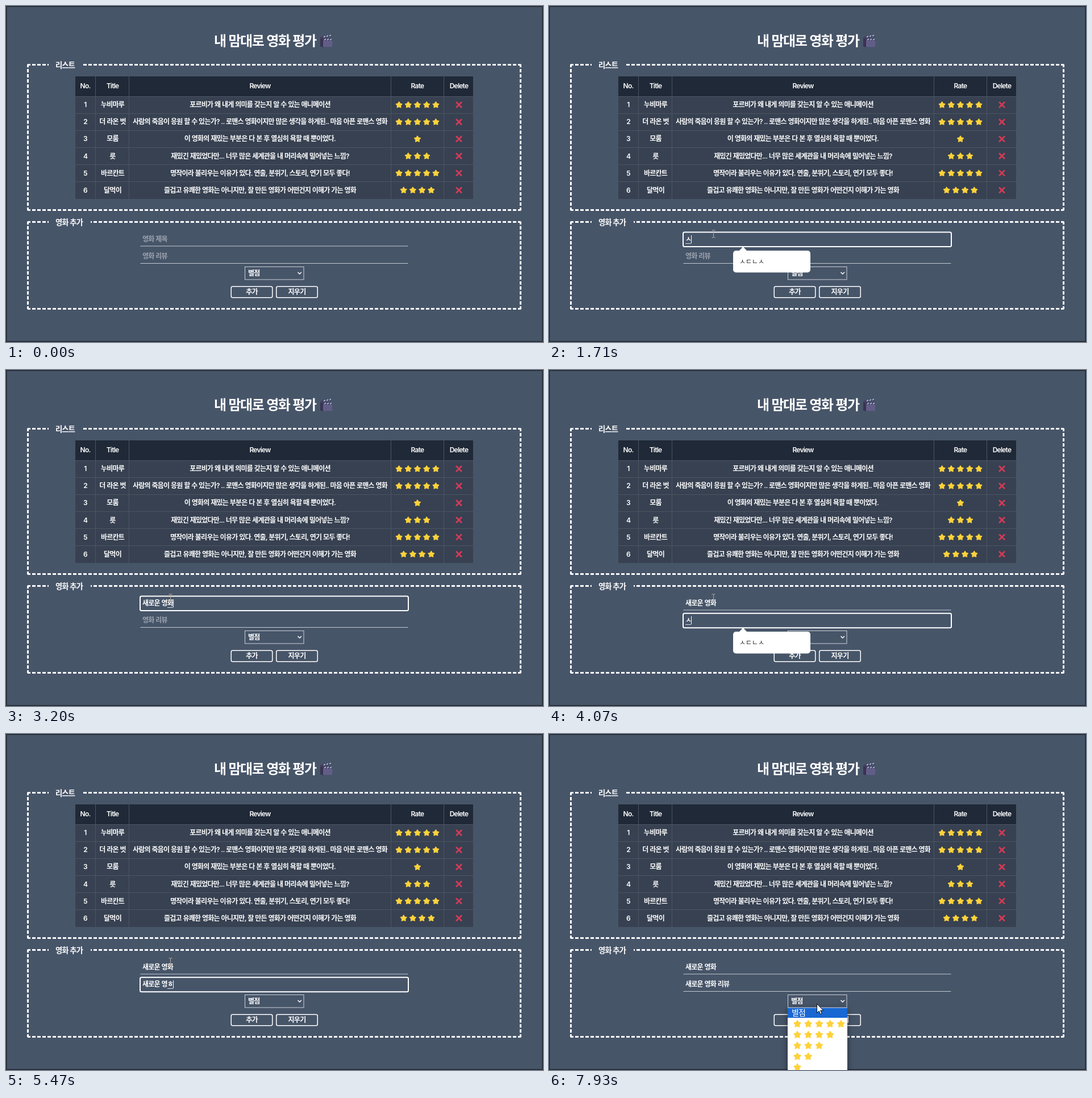
These frames come from a looping animation (945 px wide and 592 px high, 8 s). An HTML page:

```html
<!DOCTYPE html>
<html lang="ko">
<head>
<meta charset="utf-8">
<style>
  html, body { margin: 0; width: 100%; height: 100%; overflow: hidden; background: #475569; }
  body, svg text { font: 600 12px Inter, "Noto Sans CJK KR", "Noto Sans CJK", sans-serif; letter-spacing: -.065em; word-spacing: .04em; }
  body { position: relative; color: #fff; }
  svg { position: absolute; left: 0; top: 0; }
  text { fill: #fff; white-space: pre; }
  svg .title { font-size: 24px; font-weight: 700; }
  svg .legend { font-size: 13.3px; font-weight: 800; }
  svg .option { font-size: 14px; font-weight: 500; }
  svg .hint { font-weight: 400; letter-spacing: 0; fill: #222; }
  .mid { text-anchor: middle; }
  .box { position: absolute; left: 37px; width: 870px; box-sizing: border-box; border: 3px dashed #fff; border-radius: 3px; }
  .field { position: absolute; left: 240px; height: 25px; line-height: 25px; white-space: pre; }
  .field u { text-decoration: none; box-shadow: 0 1px #d5dae1; }
  .field i { display: inline-block; width: 1px; height: 14px; margin-right: -1px; vertical-align: -3px; background: #fff; }
  .field span { color: #9ca3af; }
</style>
</head>
<body>
<div class="box" style="top:102px;height:259px"></div>
<div class="box" style="top:379px;height:156px"></div>
<svg id="page" width="945" height="592"></svg>
<div class="field" style="top:398px"></div>
<div class="field" style="top:428px"></div>
<svg id="overlay" width="945" height="592">
  <g id="popup">
    <path d="M334 432l7.5-8 7.5 8z" fill="#fff"/>
    <rect x="324" y="431" width="136" height="38.5" rx="5" fill="#fff"/>
    <text class="hint" x="335" y="455">ㅅㄷㄴㅅ</text>
  </g>
  <g id="menu"></g>
  <path id="arrow" d="M0 0v16l3.7-3.5 2.4 5.6 2.5-1-2.4-5.5h5z" fill="#fff" stroke="#111" stroke-width="1"/>
  <path id="ibeam" d="M-3 -6.5h2.5l.5 .5l.5-.5h2.5M0 -6v12M-3 6.5h2.5l.5-.5l.5 .5h2.5" fill="none" stroke="#b8aa96"/>
</svg>
<script>
const LOOP = 8000;
const $ = id => document.getElementById(id);
const rect = (x, y, w, h, attrs) => `<rect x="${x}" y="${y}" width="${w}" height="${h}" ${attrs}/>`;
const line = (x1, y1, x2, y2, color) => `<path d="M${x1} ${y1}L${x2} ${y2}" stroke="${color}"/>`;
const label = (x, y, text, cls = 'mid') => `<text x="${x}" y="${y}" class="${cls}">${text}</text>`;

function star(x, y, r) {
  const points = Array.from({ length: 10 }, (_, i) => {
    const a = i * Math.PI / 5 - Math.PI / 2, d = i % 2 ? r * .55 : r;
    return `${(x + d * Math.cos(a)).toFixed(2)},${(y + d * Math.sin(a)).toFixed(2)}`;
  });
  return `<polygon points="${points.join(' ')}" fill="#ffd23b" stroke="#ffd23b" stroke-width="1.6" stroke-linejoin="round"/>`;
}
const stars = (count, x, y, gap, r) =>
  Array.from({ length: count }, (_, i) => star(x + i * gap, y, r)).join('');

const movies = [
  ['누비마루', '포르비가 왜 내게 의미를 갖는지 알 수 있는 애니메이션', 5],
  ['더 라온 벗', '사람의 죽음이 응원 할 수 있는가? .. 로맨스 영화이지만 많은 생각을 하게된.. 마음 아픈 로맨스 영화', 5],
  ['모룸', '이 영화의 재밌는 부분은 다 본 후 열심히 욕할 때 뿐이었다.', 1],
  ['릇', '재밌긴 재밌었다만... 너무 많은 세계관을 내 머리속에 밀어넣는 느낌?', 3],
  ['바르칸트', '명작이라 불리우는 이유가 있다. 연출, 분위기, 스토리, 연기 모두 좋다!', 5],
  ['달먹이', '즐겁고 유쾌한 영화는 아니지만, 잘 만든 영화가 어떤건지 이해가 가는 영화', 4],
];
const columns = [121.5, 157.5, 216.5, 677.5, 770.5, 822.5];
const centers = [139.5, 187.5, 447, 724, 797];

function table() {
  let out = rect(121, 124, 702, 216, 'fill="#374151"') + rect(121, 124, 702, 35, 'fill="#1f2937"');
  for (const x of columns) out += line(x, 124, x, 340, '#4b5563');
  ['No.', 'Title', 'Review', 'Rate', 'Delete'].forEach((name, i) => out += label(centers[i], 145, name));
  movies.forEach(([title, review, rate], i) => {
    const y = 174.1 + i * 30.07, base = Math.round(y + 4.2), top = Math.round(y - 15) + .5;
    out += line(121, top, 823, top, '#4b5563')
      + label(centers[0], base, i + 1) + label(centers[1], base, title) + label(centers[2], base, review)
      + stars(rate, centers[3] - (rate - 1) * 8.1, y + .3, 16.2, 5.4)
      + `<path d="M792 ${y - 5}l10 10m0 -10l-10 10" stroke="#d43a57" stroke-width="2.8"/>`;
  });
  return out;
}

function clapper() {
  return `<g transform="translate(553 49)">
    <path d="M4 8h17v15H4z" fill="#625d88"/><path d="M0 7l5 2v15l-5-2z" fill="#393451"/>
    <path d="M1 5L20 1v4L2 9z" fill="#453f61"/><path d="M4 8h17v4H4z" fill="#453f61"/>
    <path d="M6 6l3-2M11 5l3-2M16 4l3-2M7 11l3-2M12 11l3-2M17 11l3-2" stroke="#a9c4da" stroke-width="1.8"/></g>`;
}

const button = (x, text) =>
  rect(x + .25, 494.25, 72.5, 19.5, 'rx="2.5" fill="none" stroke="#fff" stroke-width="1.5"') + label(x + 36.5, 508, text);

$('page').innerHTML =
  rect(.5, .5, 944, 591, 'fill="none" stroke="#22262d" stroke-width="2"')
  + label(366, 69.5, '내 맘대로 영화 평가', 'title') + clapper()
  + rect(75, 100, 59, 8, 'fill="#475569"') + label(87, 109, '리스트', 'legend')
  + rect(75, 377, 74, 8, 'fill="#475569"') + label(87, 386, '영화 추가', 'legend')
  + table()
  + line(236.5, 423, 707.5, 423, '#c3c9d1') + line(236.5, 453.5, 707.5, 453.5, '#c3c9d1')
  + rect(236, 398.5, 472, 25.5, 'id="focus" rx="2.5" fill="#475569" stroke="#fff" stroke-width="2"')
  + rect(420.5, 459.5, 103.5, 22.5, 'fill="none" stroke="#ccd1d8"') + label(426, 475, '별점', '')
  + '<path d="M513.5 469l3.2 3.2 3.2-3.2" fill="none" stroke="#fff" stroke-width="1.6"/>'
  + button(396, '추가') + button(475.5, '지우기');

$('menu').innerHTML =
  rect(420, 482, 105, 116, 'fill="#fff" style="filter:drop-shadow(0 3px 6px #0007)"')
  + rect(420, 482.5, 105, 17.5, 'fill="#1967d2"') + label(427, 496, '별점', 'option')
  + [5, 4, 3, 2, 1].map((n, i) => stars(n, 437, 511 + i * 19.1, 19.2, 6.2)).join('');

// Each key press replaces the whole field text, as Hangul syllables are composed.
const fields = [
  { hint: '영화 제목', from: 880, to: 3530, keys: [
    [1710, 'ㅅ'], [1790, '새'], [1930, '샐'], [2000, '새로'], [2120, '새롱'], [2200, '새로우'], [2290, '새로운'],
    [2440, '새로운 '], [2660, '새로운 ㅇ'], [2760, '새로운 여'], [2860, '새로운 영'],
    [3070, '새로운 영ㅎ'], [3140, '새로운 영호'], [3200, '새로운 영화']] },
  { hint: '영화 리뷰', from: 3530, to: 7810, keys: [
    [4070, 'ㅅ'], [4150, '새'], [4270, '샐'], [4340, '새로'], [4450, '새롱'], [4530, '새로우'], [4620, '새로운'],
    [4790, '새로운 '], [4930, '새로운 ㅇ'], [5020, '새로운 여'], [5120, '새로운 영'],
    [5470, '새로운 영ㅎ'], [5530, '새로운 영호'], [5600, '새로운 영화'], [5670, '새로운 영화 '],
    [5860, '새로운 영화 ㄹ'], [5930, '새로운 영화 리'], [6140, '새로운 영화 리ㅂ'], [6270, '새로운 영화 리뷰']] },
];
const fieldNodes = document.querySelectorAll('.field');

function fieldHtml({ hint, from, to, keys }, t) {
  const [since, text] = keys.filter(k => k[0] <= t).pop() || [from, ''];
  const focused = t >= from && t < to;
  const caret = focused && Math.floor((t - since) / 520) % 2 === 0 ? '<i></i>' : '';
  if (!text) return `${caret}<span>${hint}</span>`;
  if (!focused) return text;
  const last = text.slice(-1);
  return text.slice(0, -1) + (last === ' ' ? last : `<u>${last}</u>`) + caret;
}

const strokes = [
  { start: 190, step: 73, path: [[190, 768, 574], [410, 590, 497], [630, 385, 428], [775, 300, 399], [920, 289, 401]] },
  { start: 7010, step: 65, path: [[6945, 289, 401], [7140, 425, 434], [7270, 469, 454.5], [7595, 471.5, 475.5]] },
];

function pointer(t) {
  const { start, step, path } = strokes[t < 7010 ? 0 : 1];
  const time = start + Math.floor((t - start) / step) * step;
  const i = path.findIndex(p => p[0] > time);
  if (i < 0) return path[path.length - 1].slice(1);
  const [t0, x0, y0] = path[i - 1], [t1, x1, y1] = path[i];
  const k = (time - t0) / (t1 - t0);
  return [x0 + (x1 - x0) * k, y0 + (y1 - y0) * k];
}

const clamp = v => Math.max(0, Math.min(1, v));
const place = (node, x, y) => node.setAttribute('transform', `translate(${x} ${y})`);

function draw(t) {
  fields.forEach((field, i) => {
    const html = fieldHtml(field, t);
    if (fieldNodes[i].dataset.html !== html) fieldNodes[i].innerHTML = fieldNodes[i].dataset.html = html;
  });
  const active = fields.findIndex(f => t >= f.from && t < f.to);
  $('focus').style.display = active < 0 ? 'none' : '';
  place($('focus'), 0, active === 1 ? 30.2 : 0);

  const opened = t < 4070 ? 1710 : 4070;
  $('popup').style.opacity = t < opened ? 0 : clamp(1 - (t - opened - 80) / 200);
  place($('popup'), 0, opened === 4070 ? 30 : 0);
  $('menu').style.opacity = t < 7810 ? 0 : clamp((t - 7750) / 150);

  const visible = t >= 190;
  const [x, y] = visible ? pointer(t) : [0, 0];
  const overField = x > 236 && x < 708 && ((y > 397 && y < 424) || (y > 428 && y < 454));
  $('arrow').style.display = visible && !overField ? '' : 'none';
  $('ibeam').style.display = visible && overField ? '' : 'none';
  place($('arrow'), x, y);
  place($('ibeam'), Math.round(x) + .5, Math.round(y) + .5);
}

function tick() {
  draw(performance.now() % LOOP);
  requestAnimationFrame(tick);
}
tick();
</script>
</body>
</html>
```
